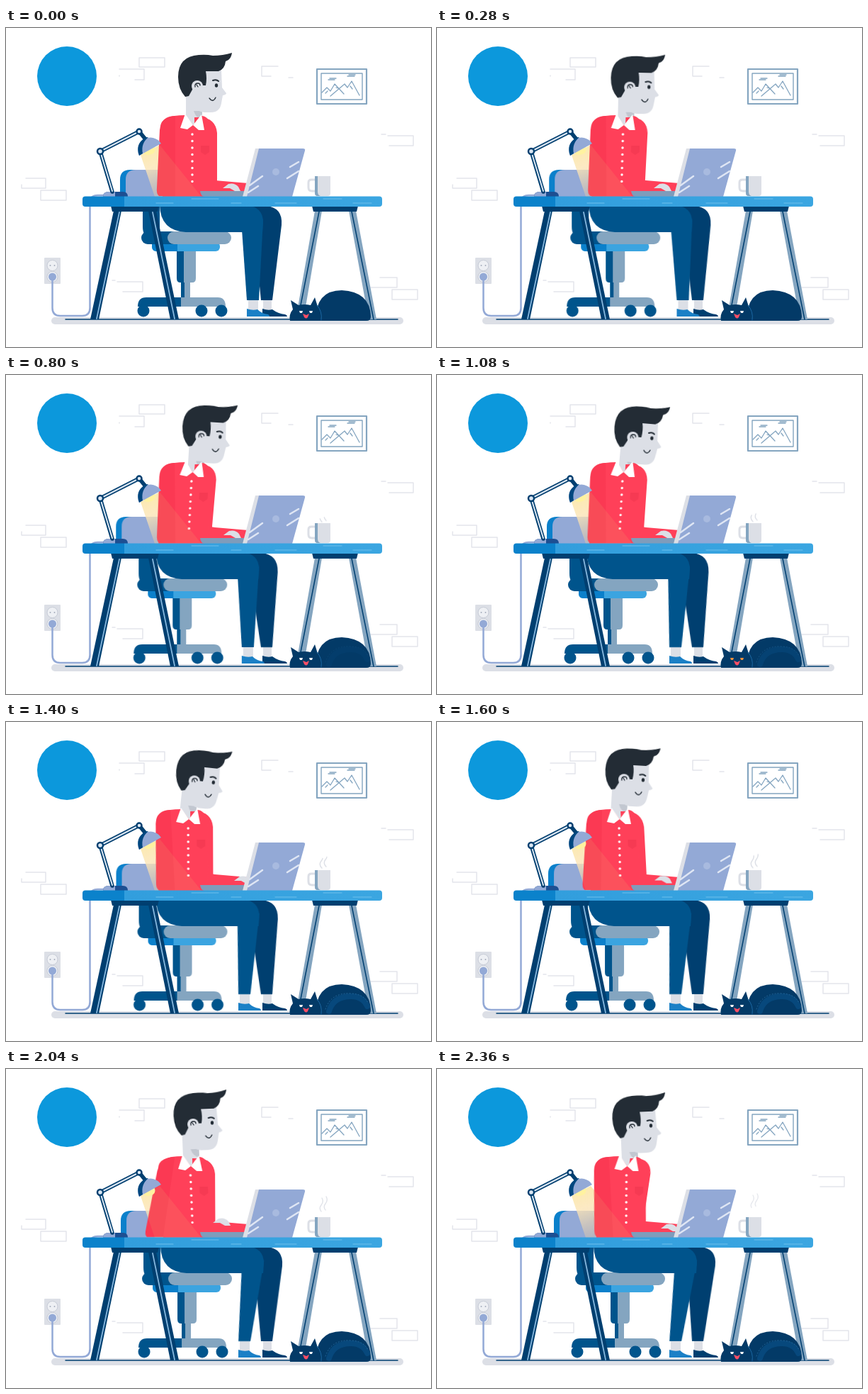
These frames come from a looping animation (600x450 px, 2400 ms). An HTML page without scripts:

```html
<!DOCTYPE html>
<html lang="en">
<head>
<meta charset="utf-8">
<title>Working at a desk</title>
<style>
  html, body { margin: 0; width: 100%; height: 100%; overflow: hidden; background: #fff; }
  svg { display: block; width: 100vw; height: 100vh; }

  .navy { fill: #003f70; }
  .blue { fill: #00548c; }
  .steel { fill: #84a5c0; }
  .mist { fill: #93a9d6; }
  .pale { fill: #dcdfe6; }
  .red { fill: #ff4059; }
  .line { fill: none; stroke-linecap: round; stroke-linejoin: round; }

  .chair, .torso, .near-arm, .far-arm, .head, .hand, .foot, .near-shin, .far-shin, .steam, .tail, .eyes {
    animation: 2400ms linear infinite;
  }
  .chair { animation-name: roll; }
  .torso { animation-name: lean; transform-origin: 0 238px; }
  .near-arm { animation-name: near-elbow; transform-origin: 0 140px; }
  .far-arm { animation-name: far-elbow; transform-origin: 0 140px; }
  .head { animation-name: nod; transform-origin: 270px 81px; }
  .hand { animation-name: type; }
  .foot { animation-name: slide; }
  .near-shin { animation-name: near-knee; transform-origin: 0 385px; }
  .far-shin { animation-name: far-knee; transform-origin: 0 385px; }
  .steam { animation-name: rise; stroke-dasharray: 1 1; }
  .tail { animation-name: curl; }
  .eyes { animation-name: squint; }

  @keyframes roll {
    0% { transform: none; }
    23.33% { transform: translateX(-5.5px); }
    45% { transform: translateX(-6px); }
    58.33% { transform: translateX(-5.5px); }
    75% { transform: translateX(-2.5px); }
    85% { transform: translateX(1px); }
    98.33%, 100% { transform: translateX(4px); }
  }
  @keyframes lean {
    0% { transform: skewX(0deg); }
    23.33% { transform: skewX(-2.9deg); }
    45% { transform: skewX(-3.1deg); }
    58.33% { transform: skewX(.2deg); }
    75%, 85% { transform: skewX(2.3deg); }
    98.33%, 100% { transform: skewX(-.3deg); }
  }
  @keyframes near-elbow {
    0% { transform: skewX(0deg); }
    23.33% { transform: skewX(3.7deg); }
    45% { transform: skewX(3.3deg); }
    58.33% { transform: skewX(3deg); }
    75% { transform: skewX(-7deg); }
    85% { transform: skewX(-10.6deg); }
    98.33%, 100% { transform: skewX(3.4deg); }
  }
  @keyframes far-elbow {
    0% { transform: skewX(0deg); }
    23.33% { transform: skewX(-3deg); }
    45% { transform: skewX(-.8deg); }
    58.33% { transform: skewX(0deg); }
    75% { transform: skewX(3.5deg); }
    85% { transform: skewX(-2deg); }
    98.33%, 100% { transform: skewX(-8.3deg); }
  }
  @keyframes nod {
    0% { transform: translate(0, 0) rotate(0deg); }
    23.33% { transform: translate(4.5px, 3.5px) rotate(2.3deg); }
    45% { transform: translate(6.5px, 6px) rotate(4.8deg); }
    58.33% { transform: translate(-4px, 1.5px) rotate(6deg); }
    75% { transform: translate(-8px, -3px) rotate(.7deg); }
    85% { transform: translate(-6px, -4px) rotate(-2.4deg); }
    98.33%, 100% { transform: translate(5px, 0) rotate(-2.4deg); }
  }
  @keyframes type {
    0%, 23.33% { transform: translate(0, 0); }
    45% { transform: translate(2px, 0); }
    58.33% { transform: translate(16px, -2px); }
    75% { transform: translate(-14px, -3px); }
    85% { transform: translate(-14px, -9px); }
    98.33%, 100% { transform: translate(10px, -1px); }
  }
  @keyframes slide {
    0% { transform: translateX(0); }
    23.33% { transform: translateX(-3px); }
    45%, 100% { transform: translateX(-12px); }
  }
  @keyframes near-knee {
    0% { transform: skewX(0deg); }
    23.33% { transform: skewX(1.3deg); }
    45% { transform: skewX(-3deg); }
    58.33% { transform: skewX(-3.3deg); }
    75% { transform: skewX(-4.8deg); }
    85% { transform: skewX(-6.6deg); }
    98.33%, 100% { transform: skewX(-8deg); }
  }
  @keyframes far-knee {
    0% { transform: skewX(0deg); }
    23.33%, 58.33% { transform: skewX(2.8deg); }
    45% { transform: skewX(3deg); }
    75% { transform: skewX(1.3deg); }
    85% { transform: skewX(-.5deg); }
    98.33%, 100% { transform: skewX(-2deg); }
  }
  @keyframes rise {
    0%, 20% { stroke-dashoffset: 1; transform: translateY(2px); opacity: 0; }
    23% { opacity: 1; }
    60% { transform: translateY(0); }
    75% { stroke-dashoffset: 0; transform: translateY(-1px); opacity: 1; }
    98.33%, 100% { stroke-dashoffset: -.15; transform: translateY(-8px); opacity: .7; }
  }
  @keyframes curl {
    0%, 25% { opacity: 0; }
    58%, 100% { opacity: 1; }
  }
  @keyframes squint {
    0%, 41% { fill: #fff; }
    43%, 48% { fill: #f0913c; }
    50%, 100% { fill: #fff; }
  }
</style>
</head>
<body>
<svg viewBox="0 0 600 450">
  <defs>
    <linearGradient id="wood">
      <stop offset=".14" stop-color="#0b82cb"/>
      <stop offset=".14" stop-color="#329edd"/>
      <stop offset="1" stop-color="#3ba6e1"/>
    </linearGradient>
    <linearGradient id="glow" gradientUnits="userSpaceOnUse" x1="201" y1="172" x2="222" y2="238">
      <stop stop-color="#fff6bd"/>
      <stop offset=".35" stop-color="#fff3c8" stop-opacity=".8"/>
      <stop offset="1" stop-color="#e6dcc4" stop-opacity=".25"/>
    </linearGradient>
    <path id="cone" d="M190 179l27-14 59 73h-66z"/>
    <path id="wisp" class="line" d="M0 0q-5-5-1-10t1-10" stroke="#dcdfe6" stroke-width="1.4" pathLength="1"/>
  </defs>

  <circle cx="86" cy="68" r="42" fill="#0c98dc"/>

  <!-- wall -->
  <path class="line" stroke="#e3e5eb" stroke-width="1.5" d="M188 42h36v13h-36zM160 58h35v15h-13M160 67v1M384 54h-23v14h13M399 70h6M530 150h6M539 152h36v14h-34M28 212h28v14H22v-5M49 229h36v14H49zM150 356h4M157 358h36v14h-28M528 352h24v14h-37M545 369h36v14h-36z"/>
  <g class="line" stroke="#84a5c0">
    <rect x="439" y="58" width="70" height="49" stroke-width="2.2"/>
    <rect x="445" y="64" width="58" height="37" stroke-width="1.4"/>
    <path stroke-width="1.3" d="M446 91l7-7 5 5 6-10 13 14M458 96l20-17 4 5 6-9 11 20M451 92l3-3M466 84l3 1M486 82l3 4"/>
    <path stroke-width="1.3" d="M455 73h9M457 71h9M482 68h10M484 66h9"/>
  </g>

  <!-- floor, socket and cable -->
  <rect class="pale" x="64" y="408" width="497" height="10" rx="5"/>
  <path class="line" stroke="#003f70" stroke-width="1.5" d="M84 411h469"/>
  <rect class="pale" x="54" y="324" width="23" height="37" rx="1"/>
  <g fill="#eef0f4" stroke="#c6cbd6">
    <circle cx="65.5" cy="335" r="7.5"/>
    <circle cx="65.5" cy="351" r="7.5"/>
  </g>
  <path class="line" stroke="#a6adbb" stroke-width="2" d="M62.5 335h0M68.5 335h0"/>
  <circle class="mist" cx="65.5" cy="351" r="5.5"/>
  <path class="line" stroke="#93a9d6" stroke-width="2.5" d="M65.5 353v42q0 11 11 11h31q11 0 11-11V247q0-11 11-11h14"/>

  <!-- right trestle -->
  <path class="steel" d="M436 258h10l-26 153h-11zM484 258h10l29 153h-11z"/>
  <path class="line" stroke="#003f70" stroke-width="1.5" d="M442 259l-30 152M488 259l31 152"/>
  <path class="navy" d="M432 251h65l-2 8h-61z"/>

  <!-- chair -->
  <g class="chair">
    <path class="blue" d="M193 250h24v44h-15q-9 0-9-14z"/>
    <path fill="#0b80cb" d="M161 238v-24q0-14 14-14h30v38z"/>
    <path class="mist" d="M169 238v-24q0-14 14-14h40v38z"/>
    <rect fill="#3ba4e0" x="206" y="302" width="96" height="13" rx="6"/>
    <path fill="#0b80cb" d="M206 302h36v13h-29q-7 0-7-7z"/>
    <path class="blue" d="M241 315h10v44h-5q-5 0-5-6zM247 355h6v27h-6z"/>
    <path class="steel" d="M251 315h17v38q0 6-5 6h-12zM252 355h8v27h-8z"/>
    <path class="steel" d="M246 380h53q11 0 11 13h-64z"/>
    <path class="blue" d="M198 380h49v13h-61q0-13 12-13z"/>
    <g class="blue">
      <circle cx="194" cy="399" r="8.5"/>
      <circle cx="276" cy="399" r="8.5"/>
      <circle cx="304" cy="399" r="8.5"/>
      <rect x="191" y="287" width="60" height="18" rx="9"/>
    </g>
    <rect class="steel" x="228" y="287" width="90" height="18" rx="9"/>
  </g>

  <!-- legs -->
  <path class="pale" d="M363 383h12v16h-12z"/>
  <path class="navy" d="M362 396q8 3 14 1 8 6 18 7 3 1 3 3h-35z"/>
  <path class="navy far-shin" d="M340 251h27q24 2 22 27l-13 106h-16l-10-100z"/>
  <g class="foot">
    <path class="pale" d="M342 383h14v16h-14z"/>
    <path fill="#1b80c6" d="M340 396q8 3 15 1 6 6 15 7 2 1 2 3h-32z"/>
    <path class="blue near-shin" d="M332 270h31l-6 114h-17z"/>
  </g>
  <path class="blue chair" d="M217 250h122q24 2 24 24l-1 14H254q-36-2-37-38z"/>

  <use href="#cone" fill="url(#glow)"/>

  <!-- person -->
  <g class="head">
    <path class="pale" d="M254 80h23v66h-23z"/>
    <path fill="#c2c7d0" d="M265 117h12v12q-9-2-12-12z"/>
    <path class="pale" d="M255 60h49l1 24 6 8q0 2-5 3l-2 11q-2 13-15 13h-9q-25-4-25-34z"/>
    <path fill="#232c35" d="M253 97q-10-11-10-28 0-29 29-31 11-1 20 1 14 0 27-4-1 7-5 10l-4 2q-1 11-10 14h-18q2 10 0 20h-8q-9-3-11 6l-5 9z"/>
    <circle class="pale" cx="270" cy="82" r="8"/>
    <path class="line" stroke="#232c35" stroke-width="1.3" d="M267 83q-1-5 4-5 3 0 3 3M269 80l2 3M287 99q5 7 9-1"/>
    <path class="line" stroke="#232c35" stroke-width="2" d="M292 74q5-2 8 1"/>
    <ellipse cx="297" cy="81" rx="2.2" ry="2.8" fill="#232c35"/>
  </g>
  <path class="red" d="M275 212l20 3 47 4v12h-67z"/>
  <g class="chair">
    <g class="torso">
      <path class="red far-arm" d="M266 126h8q22 1 24 22v68l-5 14h-27z"/>
      <path class="red" d="M253 123l11 14 12-13q10 0 14 16l1 98h-70l-3-98q0-17 35-17z"/>
      <path fill="#f63a53" d="M275 166h12v9l-6 4-6-4z"/>
      <path class="near-arm" fill="#fb3953" d="M217 144q2-20 22-20v113h-23q-4-3-3-12z"/>
      <path fill="#fff" d="M253 121l-7 20 10 2 8-6zM276 122l4 22-8 0-8-7z"/>
      <path class="line" stroke="#fff" stroke-width="3.4" stroke-dasharray="0 9.5" d="M263 150v68"/>
    </g>
  </g>
  <path class="pale hand" d="M306 226l8-6q9-2 14 4l3 6h-8l-7-4z"/>

  <!-- lamp -->
  <use href="#cone" fill="#e8b070" opacity=".16"/>
  <path fill="#1d4f92" d="M137 238q0-7 8-7h20q7 0 7 7z"/>
  <path class="mist" d="M137 238q0-7 8-7h9v7z"/>
  <g class="line">
    <path stroke="#003f70" stroke-width="5.5" d="M150 231l-17-57 55-28 9 11"/>
    <path stroke="#dbe6f2" stroke-width="2" d="M150 230l-17-56 55-28"/>
    <g fill="#dbe6f2" stroke="#003f70" stroke-width="2.5">
      <circle cx="133" cy="174" r="4"/>
      <circle cx="188" cy="146" r="3.5"/>
    </g>
  </g>
  <path fill="#fff2a0" d="M194 176l16-8q2 8-5 10-7 3-11-2z"/>
  <path class="mist" d="M188 180a17.7 17.7 0 0 1 31-17z"/>
  <path fill="#00477f" d="M188 180q-6-16 8-25 2-1 5-1-11 9-8 23z"/>

  <!-- laptop and mug -->
  <path fill="#7f9cbb" d="M274 230h64v8h-58q-5-1-6-8z"/>
  <path class="mist" d="M353 170h66q4 0 3 3l-18 65h-68z"/>
  <path class="pale" d="M352 170h5l-17 68h-6z"/>
  <circle cx="381" cy="203" r="5" fill="#a8badf"/>
  <path class="line" stroke="#dfe6f4" stroke-width="2.5" d="M401 196l12-7M397 212l16-10M344 222l18-13M342 232l14-9"/>
  <path class="line" stroke="#dcdfe6" stroke-width="3" d="M437 214h-6q-4 0-4 4v7q0 5 5 5h5"/>
  <path class="pale" d="M436 209h22v24q0 4-4 4h-14q-4 0-4-4z"/>
  <path class="steel" d="M436 209h4v22q0 5 4 6h-4q-4 0-4-4z"/>
  <g class="steam">
    <use href="#wisp" x="446" y="206"/>
    <use href="#wisp" x="452" y="204"/>
  </g>

  <!-- left trestle and desk top -->
  <path class="navy" d="M152 258h11l-32 153h-12zM201 258h11l32 153h-12z"/>
  <path class="line" stroke="#84b5dc" stroke-width="1.8" d="M160 260l-32 150M207 260l31 150"/>
  <path class="navy" d="M148 251h68l-2 8h-64z"/>
  <rect x="108" y="237.5" width="423" height="14.5" rx="4" fill="url(#wood)"/>
  <path class="line" stroke="#6fc0ec" d="M212 247h24M262 241h38M318 247h14M380 247h30M448 241h26M490 247h26"/>

  <!-- cat -->
  <path fill="#033a67" d="M437 413q0-43 37-43 40 2 41 37 0 6-6 6z"/>
  <g class="line tail">
    <path stroke="#07487c" stroke-width="8" d="M456 408q6-21 31-21 17 0 23 14"/>
    <path stroke="#286a9d" stroke-width="1" stroke-dasharray="1 3" d="M451 405q8-24 37-22 17 1 23 13"/>
  </g>
  <path fill="#033a67" d="M401 413q-2-9 4-16l-3-13 11 7q8-2 17 0l6-11 4 13q7 8 5 20z"/>
  <path class="line" stroke="#1c67a3" stroke-width="1" d="M439 391q8 9 6 21"/>
  <path class="eyes" d="M414 399h5l-1 3h-3zM428 399h5l-1 3h-3z"/>
  <path fill="#ff4e66" d="M419 403l5 2 4-2-2 5q-2 3-5 0z"/>
</svg>
</body>
</html>
```
